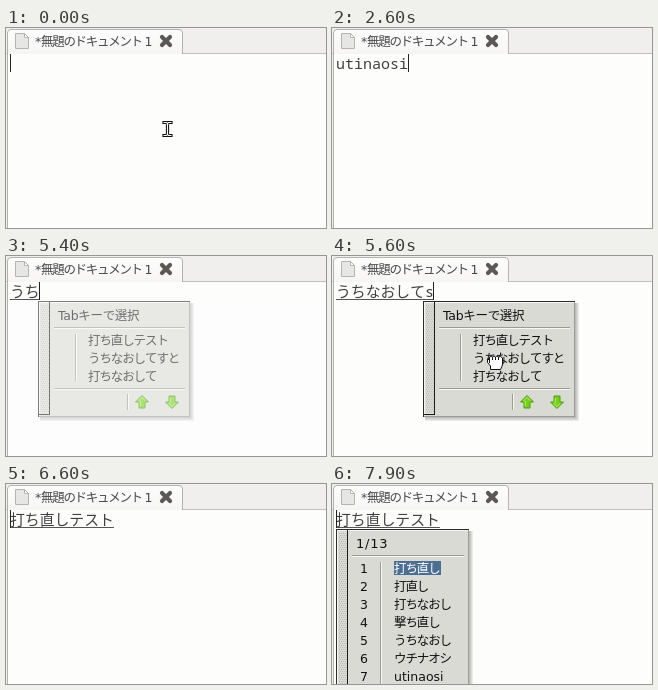
Recreate the animation shown at these times as an HTML page with a canvas. Size 320 by 200 pixels, loop 8 s.

```html
<!DOCTYPE html>
<html lang="ja">
<head>
<meta charset="utf-8">
<style>
  html, body { margin: 0; width: 100%; height: 100%; overflow: hidden; background: #fdfdfc; }
  canvas { display: block; width: 320px; height: 200px; }
</style>
</head>
<body>
<canvas id="stage"></canvas>
<script>
const LOOP = 8000;
const PAGE = '#fdfdfc';
const INK = '#404040';
const UI_FONT = '"DejaVu Sans", "Noto Sans CJK JP", "Noto Sans CJK", sans-serif';
const EDIT_FONT = '"Noto Sans Mono", "Noto Sans CJK JP", "Noto Sans CJK", monospace';

const ROMAJI = 'utinaositesuto';
const KEY_TIMES = [800, 1200, 1400, 1700, 2000, 2200, 2400, 2600, 2800, 2900, 3200, 3300, 3600, 3800];
const PREEDIT = [
  [5300, 'う'], [5400, 'うち'], [5500, 'うちなおs'], [5600, 'うちなおしてs'], [5700, 'うちなおしてすと'],
  [6500, '打ち直しテスト'], [7200, '打直しテスト'], [7800, '打ち直しテスト']
];
const SUGGESTIONS = ['打ち直しテスト', 'うちなおしてすと', '打ちなおして'];
const LONG_SUGGESTIONS = ['打ち直しテスト', '打ち直しテストを', '打ち直しテストを行った'];
const CANDIDATES = ['打ち直し', '打直し', '打ちなおし', '撃ち直し', 'うちなおし', 'ウチナオシ', 'utinaosi'];

const canvas = document.getElementById('stage');
const ctx = canvas.getContext('2d');
const ratio = window.devicePixelRatio || 1;
canvas.width = 320 * ratio;
canvas.height = 200 * ratio;

function rect(x, y, w, h, color) {
  ctx.fillStyle = color;
  ctx.fillRect(x, y, w, h);
}

function text(string, x, y, size, { color = '#111', font = UI_FONT, spacing = 0, weight = 400 } = {}) {
  ctx.font = `${weight} ${size}px ${font}`;
  ctx.letterSpacing = spacing + 'px';
  ctx.fillStyle = color;
  ctx.fillText(string, x, y);
  return ctx.measureText(string).width;
}

function stroke(path, color, width) {
  ctx.strokeStyle = color;
  ctx.lineWidth = width;
  ctx.stroke(path);
}

function shape(path, fill, line) {
  const p = new Path2D(path);
  ctx.fillStyle = fill;
  ctx.fill(p);
  stroke(p, line, 1);
}

function drawWindow() {
  rect(0, 0, 320, 200, PAGE);
  rect(0, 0, 320, 25, '#f0efee');
  rect(0, 25, 320, 1, '#c0bebb');
  rect(0, 26, 1, 174, '#f0efed');
  rect(1, 25, 1, 175, '#b5b3b0');

  const shade = ctx.createLinearGradient(0, 1, 0, 27);
  shade.addColorStop(0, '#fdfdfd');
  shade.addColorStop(1, '#f6f5f4');
  shape('M1.5 26V5Q1.5 1.5 5 1.5H173Q176.5 1.5 176.5 5V26', shade, '#b5b3b0');

  shape('M9.5 5.5H18.5L22.5 9.5V20.5H9.5Z', '#e6e6e4', '#b4b4b1');
  shape('M18.5 5.5V9.5H22.5Z', '#ffffff', '#b4b4b1');
  text('*', 29, 18, 12.5, { color: '#484848' });
  text('無題のドキュメント 1', 35, 18, 12.5, { color: '#484848', spacing: -1.3 });

  ctx.lineCap = 'round';
  stroke(new Path2D('M156 9L164 17M164 9L156 17'), '#5a5956', 4.2);
  ctx.lineCap = 'butt';
}

function caret(x) {
  rect(x, 26, 1, 18, '#222');
}

function drawText(t) {
  if (t < 5300) {
    const count = KEY_TIMES.filter(time => time <= t).length;
    text(ROMAJI.slice(0, count), 4, 41, 15, { color: INK, font: EDIT_FONT, weight: 300 });
    if (t < 300 || count) caret(4 + 9 * count);
    return;
  }
  const string = PREEDIT.filter(([time]) => time <= t).pop()[1];
  const width = text(string, 4, 41, 14.85, { color: INK, font: EDIT_FONT });
  rect(4, 43, width, 1, '#555');
  if (t < 6500) caret(Math.floor(3.5 + width));
  else if (t < 7200 || t >= 7800) caret(4);
}

// Engraved separators
function hLine(x1, x2, y) {
  rect(x1, y, x2 - x1, 1, '#9b9b96');
  rect(x1, y + 1, x2 - x1, 1, '#f7f7f4');
}

function vLine(x, y1, y2) {
  rect(x, y1, 1, y2 - y1, '#9b9b96');
  rect(x + 1, y1, 1, y2 - y1, '#f7f7f4');
}

// Raised box: light on the top and left inside, dark on the bottom and right
function bevel(x, y, w, h, dark) {
  rect(x, y, w, h, dark);
  rect(x, y, w - 1, h - 1, '#f4f4f1');
  rect(x + 1, y + 1, w - 2, h - 2, '#dadad5');
}

function panel(x, w, h) {
  const y = 45;
  for (let i = 4; i > 0; i--) rect(x + 2, y + 2, w - 2 + i, h - 2 + i, 'rgba(0,0,0,.07)');
  rect(x, y, w, h, '#2c2c2b');
  bevel(x + 1, y + 1, w - 1, h - 1, '#9a9a96');

  // Dotted grip along the left edge
  bevel(x + 1, y + 1, 11, h - 3, '#1c1c1b');
  ctx.fillStyle = '#bcbcb7';
  for (let row = 0; row < h - 8; row += 2)
    for (let col = 0; col < 7; col += 2)
      ctx.fillRect(x + 3 + (col + row / 2 % 2), y + 4 + row, 1, 1);
}

function arrow(cx, direction) {
  ctx.save();
  ctx.translate(cx, 146);
  ctx.scale(1, direction);
  shape('M0 -6.5L6.5 0H3V6H-3V0H-6.5Z', '#73d216', '#4e9a14');
  stroke(new Path2D('M-3.5 -1L0 -4.7L3 -1.5M-1.7 -1V4'), '#b4ef70', 1);
  ctx.restore();
}

function label(string, x, y, color) {
  const spacing = /^[a-z]+$/.test(string) ? 0 : -1.1;
  text(string, x, y, 12.5, { color, spacing });
}

function suggestionPanel(x, w, items) {
  panel(x, w, 116);
  text('Tabキーで選択', x + 20, 64, 12.5, { spacing: -0.3 });
  hLine(x + 16, x + w - 5, 71);
  vLine(x + 37, 78, 125);
  items.forEach((item, i) => label(item, x + 50, 89 + 18 * i));
  hLine(x + 16, x + w - 5, 132);
  vLine(x + w - 63, 138, 154);
  arrow(x + w - 48, 1);
  arrow(x + w - 18, -1);
}

function candidatePanel(selected) {
  panel(4, 133, 170);
  text(`${selected + 1}/13`, 24, 64, 13, { spacing: 0.8 });
  hLine(20, 132, 71);
  vLine(48, 78, 200);
  CANDIDATES.forEach((item, i) => {
    const y = 89 + 18 * i;
    text(String(i + 1), 28, y, 12.5);
    if (i === selected) rect(62, y - 12, item.length * 11.75, 14, '#4b6e92');
    label(item, 62, y, i === selected ? '#fff' : '#111');
  });
}

// A panel fades in over the blank page in five steps, so a wash of page colour does it
function fadeIn(t, start) {
  ctx.globalAlpha = Math.max(0, 1 - (Math.floor((t - start) / 100) + 1) / 5);
  rect(2, 45, 318, 155, PAGE);
  ctx.globalAlpha = 1;
}

function drawPanels(t) {
  if (t >= 5300 && t < 6500) {
    const x = t < 5400 ? 17 : t < 5500 ? 32 : t < 5600 ? 62 : t < 5700 ? 91 : 100;
    suggestionPanel(x, 152, SUGGESTIONS);
    fadeIn(t, 5200);
  } else if (t >= 6500 && t < 6600) {
    suggestionPanel(120, 190, LONG_SUGGESTIONS);
  } else if (t >= 7200) {
    candidatePanel(t < 7800 ? 1 : 0);
    fadeIn(t, 7200);
  }
}

function drawPointer(t) {
  if (t < 800) {
    const beam = new Path2D('M158 94.5H160.5L161.5 95.5L162.5 94.5H165M161.5 95V107M158 107.5H160.5L161.5 106.5L162.5 107.5H165');
    ctx.lineCap = 'square';
    stroke(beam, '#111', 3.2);
    stroke(beam, '#fff', 1.1);
    ctx.lineCap = 'butt';
  } else if (t >= 5500 && t < 5900) {
    shape('M158.5 113.5V110L155.5 106.5V103.5H157.5V101Q159 99 160.5 101Q162 99 163.5 101Q165 99 166.5 101Q168.5 99.5 170.5 102V109L168.5 113.5Z', '#fff', '#111');
    stroke(new Path2D('M160.5 101V104M163.5 101V104M166.5 101V104M157.5 103V107'), '#111', 1);
  }
}

function frame(now) {
  const t = now % LOOP;
  ctx.setTransform(ratio, 0, 0, ratio, 0, 0);
  drawWindow();
  drawText(t);
  drawPanels(t);
  drawPointer(t);
  requestAnimationFrame(() => frame(performance.now() - startTime));
}

const startTime = performance.now();
frame(0);
</script>
</body>
</html>
```
